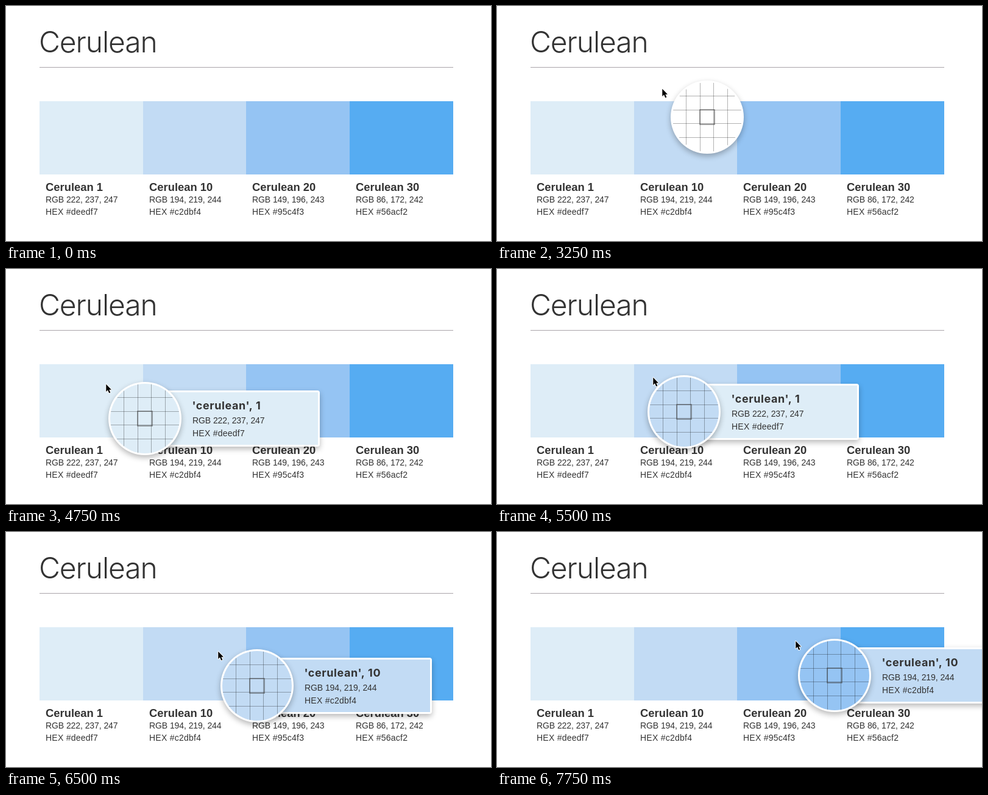
These frames come from a looping animation (796 by 385 pixels, 8000 ms). An HTML page with a canvas:

```html
<!DOCTYPE html>
<html lang="en">
<head>
<meta charset="utf-8">
<title>Cerulean</title>
<style>
  html, body { margin: 0; width: 100%; height: 100%; overflow: hidden; background: #fff; }
  canvas { display: block; }
</style>
</head>
<body>
<canvas id="stage" width="796" height="385"></canvas>
<script>
const ctx = document.getElementById('stage').getContext('2d');
const LOOP = 8000, STEP = 250, LAG = 28;
const LEFT = 55, TOP = 156, WIDTH = 169.75, HEIGHT = 120;
const SANS = '"Liberation Sans", Arial, sans-serif', UI = 'Inter, sans-serif';

const swatches = [
  { tone: 1, hex: '#deedf7' },
  { tone: 10, hex: '#c2dbf4' },
  { tone: 20, hex: '#95c4f3' },
  { tone: 30, hex: '#56acf2' }
];

// Eased strokes of the pointer: start time, end time, new coordinate.
const strokesX = [[2000, 2500, 506], [2400, 3730, 172], [3750, 4200, 164], [5200, 5800, 348], [6900, 7550, 490]];
const strokesY = [[1800, 1950, -125], [2500, 3520, 190], [3600, 4200, 188],
  [5200, 5500, 177], [5600, 6200, 195], [6900, 7300, 178]];

function smooth(u) {
  u = Math.min(1, Math.max(0, u));
  return u * u * (3 - 2 * u);
}

const follow = (strokes, start, t) =>
  strokes.reduce((v, [a, b, to]) => v + (to - v) * smooth((t - a) / (b - a)), start);

const pointerAt = t =>
  [follow(strokesX, 515, t), follow(strokesY, -200, t)].map(Math.round);

const rgb = hex =>
  'RGB ' + [1, 3, 5].map(i => parseInt(hex.slice(i, i + 2), 16)).join(', ');

function text(str, x, y, font, spacing = 0) {
  ctx.font = font;
  ctx.letterSpacing = spacing + 'px';
  ctx.fillStyle = '#333';
  ctx.fillText(str, x, y);
}

function values(hex, x, y, leading) {
  text(rgb(hex), x, y, '14px ' + SANS, -0.08);
  text('HEX ' + hex, x, y + leading, '14px ' + SANS, 0.25);
}

function withShadow(draw) {
  ctx.save();
  ctx.shadowColor = 'rgba(0,0,0,.28)';
  ctx.shadowBlur = 10;
  ctx.shadowOffsetY = 4;
  ctx.fillStyle = '#fff';
  draw();
  ctx.restore();
}

function disc(x, y, r) {
  ctx.beginPath();
  ctx.arc(x, y, r, 0, 7);
  ctx.fill();
}

function colorAt(x, y) {
  if (y < TOP || y >= TOP + HEIGHT) return '#fff';
  const s = swatches[Math.floor((x - LEFT) / WIDTH)];
  return s ? s.hex : '#fff';
}

function page() {
  ctx.fillStyle = '#fff';
  ctx.fillRect(0, 0, 796, 385);
  text('Cerulean', 54, 75.5, '300 48px ' + UI, -1.1);
  ctx.fillStyle = '#aaa5aa';
  ctx.fillRect(LEFT, 100, 679, 1);
  const edge = i => Math.round(LEFT + i * WIDTH - 0.1);
  swatches.forEach(({ tone, hex }, i) => {
    const x = edge(i);
    ctx.fillStyle = hex;
    ctx.fillRect(x, TOP, edge(i + 1) - x, HEIGHT);
    text('Cerulean ' + tone, x + 10, 303, 'bold 18.4px ' + SANS);
    values(hex, x + 10, 321.6, 20);
  });
}

function card(x, y, { tone, hex }) {
  withShadow(() => {
    ctx.beginPath();
    ctx.roundRect(x, y - 46, 287, 92, 4);
    ctx.fill();
  });
  ctx.fillStyle = hex;
  ctx.fillRect(x, y - 43, 284, 86);
  text(`'cerulean', ${tone}`, x + 77.5, y - 15, '700 18px ' + UI, 0.6);
  values(hex, x + 78, y + 8, 21);
}

function lens(x, y, color) {
  withShadow(() => disc(x, y, 60));
  ctx.fillStyle = color;
  disc(x, y, 57);
  ctx.save();
  ctx.clip();
  ctx.fillStyle = 'rgba(0,0,0,.3)';
  for (let k = -1.5; k < 2; k++) {
    const d = Math.floor(22.6 * k - 0.5);
    ctx.fillRect(x + d, y - 57, 1, 114);
    ctx.fillRect(x - 57, y + d, 114, 1);
  }
  ctx.restore();
  ctx.strokeStyle = 'rgba(60,60,60,.65)';
  ctx.lineWidth = 1.5;
  ctx.strokeRect(x - 12, y - 12, 24, 24);
}

const arrow = new Path2D('M0 0V13.2L3 10.4L5.3 15.8L7.7 14.8L5.4 9.6H9.4Z');

function pointer(x, y) {
  ctx.save();
  ctx.translate(x + 0.3, y + 0.8);
  ctx.scale(0.92, 0.92);
  ctx.strokeStyle = '#fff';
  ctx.lineWidth = 2;
  ctx.lineJoin = 'round';
  ctx.stroke(arrow);
  ctx.fillStyle = '#000';
  ctx.fill(arrow);
  ctx.restore();
}

function frame(now) {
  const t = Math.floor(now % LOOP / STEP) * STEP;
  const [px, py] = pointerAt(t);
  const [x, y] = pointerAt(t - LAG).map((v, i) => v + [64, 57][i]);
  page();
  if (t >= 4750) card(x, y, swatches[t < 6500 ? 0 : 1]);
  lens(x, y, colorAt(px, py));
  pointer(px, py);
  requestAnimationFrame(frame);
}
requestAnimationFrame(frame);
</script>
</body>
</html>
```
